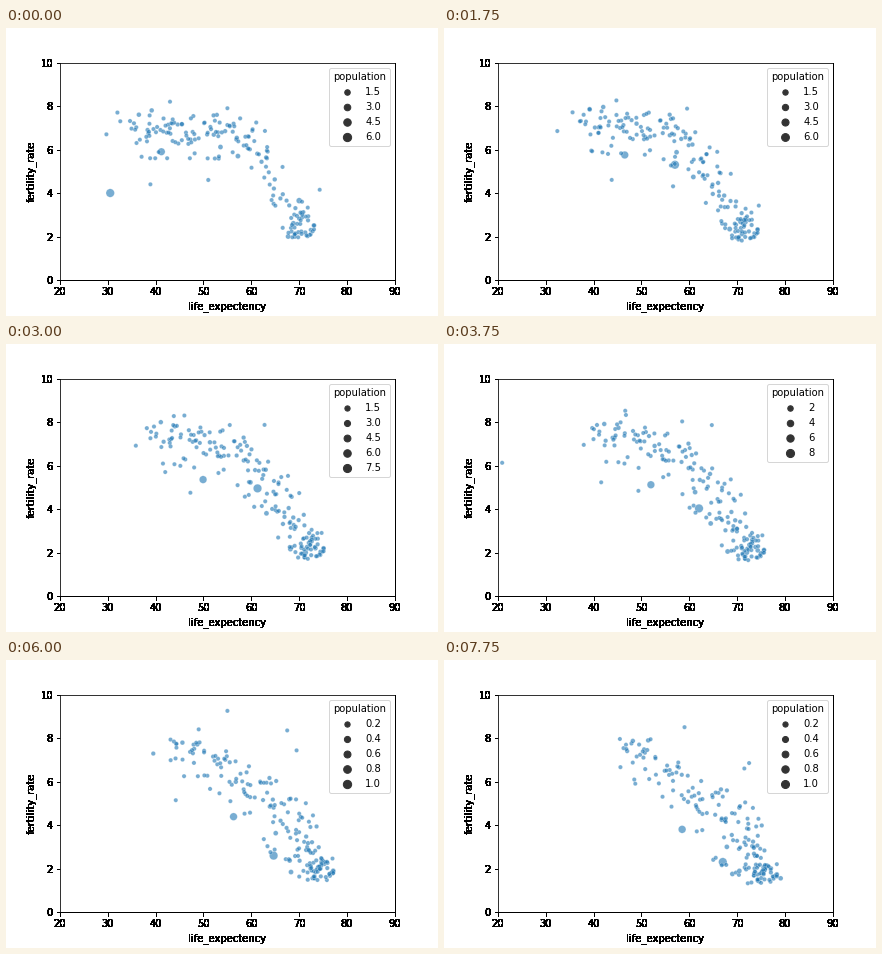
Recreate the animation shown at these times as a matplotlib script. Size 432 by 288 pixels, loop 8000 ms.

```python
import matplotlib.pyplot as plt
import numpy as np
from matplotlib.animation import FuncAnimation

FRAMES, INTERVAL = 32, 250
LAST = FRAMES - 1
BOX = [0.125, 0.125, 0.775, 0.755]
BLUE = "#1f77b4"
rng = np.random.default_rng(12)
years = np.arange(FRAMES)


def mix(a, b, s):
    return a + (b - a) * s


def sigmoid(v):
    return 1 / (1 + np.exp(-v))


def dip(center, width, depth):
    """A sudden fall with a flat bottom."""
    return -depth * np.exp(-((years - center) / width) ** 8)


# ---- Countries that stand out: key points (time, life, births) ----
def track(pop, *points, shock=0):
    t, life, births = zip(*points)
    pop_times = np.linspace(0, LAST, len(pop))
    return (np.interp(years, t, life) + shock,
            np.interp(years, t, births),
            np.interp(years, pop_times, pop))


giant_pop = np.interp(years, [0, 7, 19, LAST], [644, 745, 980, 1170])
tracks = np.array([
    track(giant_pop, (0, 30.5, 4), (3, 50.7, 7.4), (7, 57, 5.3),
          (12, 61.3, 4.95), (19, 63, 2.8), (LAST, 67, 2.3)),
    track([450, 888], (0, 41.2, 5.9), (7, 46.5, 5.75), (19, 54.7, 4.8),
          (LAST, 58.5, 3.8)),
    # large industrial countries
    track([187, 256], (0, 70, 3.65), (12, 71.3, 2), (LAST, 75.6, 2.05)),
    track([120, 148], (0, 68.8, 2.6), (19, 67.8, 1.9), (LAST, 69, 1.75)),
    track([93, 124], (0, 67.7, 2), (12, 73.4, 2.2), (LAST, 79.1, 1.55)),
    # short lives, many children
    track([5, 9], (0, 29.7, 6.7), (7, 32.4, 6.85), (LAST, 49, 7.15)),
    track([9, 13], (0, 32, 7.7), (LAST, 47.9, 7.75)),
    track([5, 12], (0, 32.6, 7.3), (24, 55, 9.25), (LAST, 59, 8.5)),
    track([3, 7], (0, 43, 8.2), (24, 49, 8.4), (LAST, 49.5, 7.7)),
    # fast gains in life expectancy
    track([1, 2], (0, 43.5, 7.2), (19, 62.5, 8.25), (24, 67.5, 8.35),
          (LAST, 71.5, 6.6)),
    track([1, 2], (0, 55, 7.9), (19, 67.3, 7.85), (LAST, 72.5, 6.85)),
    # below and right of the crowd
    track([1, 1], (0, 38.9, 4.4), (LAST, 60.5, 5.3)),
    track([11, 20], (0, 51, 4.6), (12, 60.6, 4.1), (LAST, 65, 2.4)),
    track([1, 1], (0, 74.3, 4.15), (12, 74.7, 2.9), (LAST, 78.3, 2.2)),
    # sudden drops
    track([1, 1], (0, 36, 6.3), (12, 42, 5.7), (19, 41, 4.6),
          (LAST, 48.7, 5.9)),
    track([6, 9], (0, 41, 6.9), (LAST, 54.4, 5.3), shock=dip(17, 3.4, 27)),
    track([22, 50], (0, 38.3, 6.9), (LAST, 47, 7.4),
          shock=dip(25, 1.08, 9.5)),
])

# ---- The crowd: a band that slides down a slope, and a tight rich group ----
BAND, RICH = 128, 40
COUNT = BAND + RICH
rank = (np.arange(BAND) + rng.random(BAND)) / BAND
side, noise_a, noise_b = np.clip(rng.normal(size=(3, COUNT)), -2, 2)
turn = rng.normal(0, .025, COUNT)
crowd_pop = np.clip(rng.lognormal(1.6, 1.2, COUNT), .2, 110)


def crowd(t):
    s = t / LAST
    z = noise_a * np.cos(turn * t) + noise_b * np.sin(turn * t)

    gain = 1 - (1 - rank) ** mix(1, 1.8, s)
    band_life = mix(mix(35.5, 46, s), mix(68, 74.5, s), gain)
    band_life = band_life + side[:BAND]
    slope = sigmoid((band_life - mix(64.5, 65, s)) / mix(2, 7.5, s))
    band_births = mix(6.7, 7.8, s) - mix(4.2, 6.6, s) * slope
    band_births = band_births + (.55 + .55 * slope) * z[:BAND]

    rich_life = mix(70.3, 75.5, s) + 1.4 * side[BAND:]
    rich_births = mix(2.6, 1.8, s) + mix(.5, .3, s) * z[BAND:]

    life = np.append(band_life, rich_life)
    births = np.append(band_births, rich_births)
    floor = mix(1.9, 1.3, s)
    births = floor + abs(births - floor)
    births = 8 - abs(8 - births)
    return life, births, crowd_pop * (1 + .022 * t)


# ---- Drawing ----
def style(ax):
    ax.set(xlim=(20, 90), ylim=(0, 10),
           xlabel="life_expectency", ylabel="fertility_rate")


def area(pop, top):
    return 18 + 54 * np.asarray(pop) / top


def add_legend(ax, top):
    step = 150 if top <= 900 else 200
    unit = 1000 if top >= 1000 else 100
    digits = 0 if step == 200 and unit == 100 else 1
    handles = [ax.scatter([], [], s=area(v, top), color=".2",
                          label=f"{v / unit:.{digits}f}")
               for v in np.arange(step, top + 1e-6, step)]
    ax.legend(handles=handles, title="population", loc="upper right")


fig = plt.figure(figsize=(6, 4), dpi=72, facecolor="white")
ax = fig.add_axes(BOX)
style(ax)

# The outer text looks painted over many times: its soft edges turn black.
fig.canvas.draw()
ink = np.asarray(fig.canvas.buffer_rgba())[..., :3] / 255
fig.figimage(ink ** 30, origin="upper", zorder=-1)


def update(t):
    ax.clear()
    style(ax)
    life, births, pop = np.hstack([tracks[:, :, t].T, crowd(t)])
    top = pop.max()
    ax.scatter(life, births, s=area(pop, top), color=BLUE, alpha=.6,
               edgecolor="w", linewidth=.34)
    add_legend(ax, top)
    return []


anim = FuncAnimation(fig, update, frames=FRAMES, interval=INTERVAL,
                     repeat=True, repeat_delay=0, blit=False)
plt.show()
```
